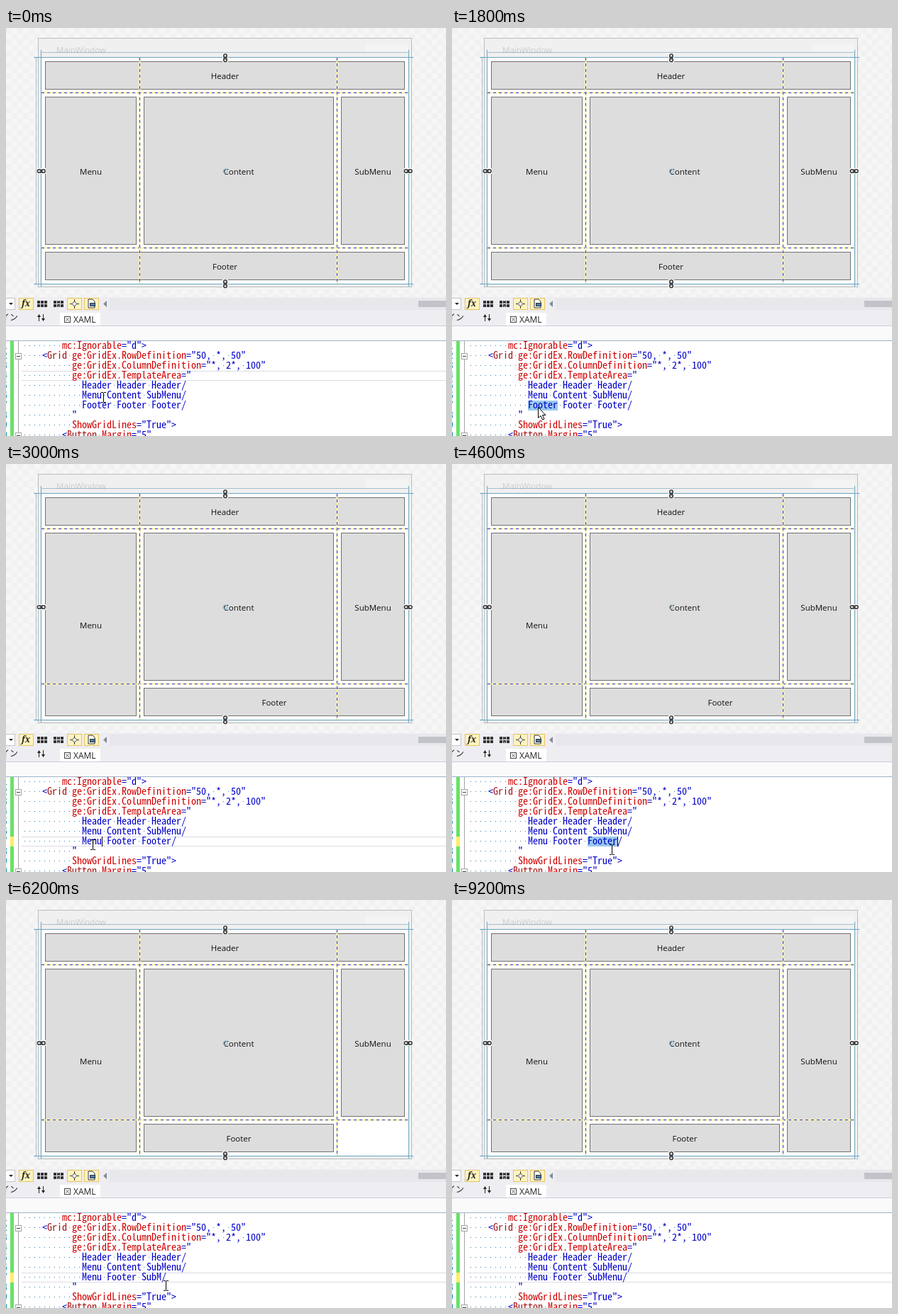
Recreate the animation shown at these times as an HTML page with a canvas. Size 620 px wide and 576 px high, loop 9.4 s.

```html
<!DOCTYPE html>
<html>
<head>
<meta charset="utf-8">
<style>
  html, body { margin: 0; width: 100%; height: 100%; overflow: hidden; background: #fff }
  canvas { display: block }
</style>
</head>
<body>
<canvas id="stage" width="620" height="576"></canvas>
<script>
const ctx = document.getElementById('stage').getContext('2d');
const LOOP = 9400, STEP = 200, CHAR = 7, LINE = 14, CODE_X = 23;
const UI = '"Open Sans", "Noto Sans", sans-serif';
const MONO = '"Noto Sans Mono CJK JP", "DejaVu Sans Mono", "Liberation Mono", monospace';

// Pick the monospace size whose advance equals one code column.
ctx.font = `100px ${MONO}`;
const monoFont = `${100 * CHAR / ctx.measureText('0').width}px ${MONO}`;

function rect(x, y, w, h, fill, stroke) {
  if (fill) { ctx.fillStyle = fill; ctx.fillRect(x, y, w, h); }
  if (stroke) {
    ctx.strokeStyle = stroke;
    ctx.lineWidth = 1;
    ctx.strokeRect(x + .5, y + .5, w - 1, h - 1);
  }
}

function line(x1, y1, x2, y2, color, dash = [], width = 1) {
  ctx.strokeStyle = color;
  ctx.lineWidth = width;
  ctx.setLineDash(dash);
  ctx.beginPath();
  ctx.moveTo(x1, y1);
  ctx.lineTo(x2, y2);
  ctx.stroke();
  ctx.setLineDash([]);
}

function poly(points, fill, stroke) {
  const path = new Path2D('M' + points + 'Z');
  ctx.fillStyle = fill;
  ctx.fill(path);
  if (stroke) { ctx.strokeStyle = stroke; ctx.lineWidth = 1; ctx.stroke(path); }
}

function text(s, x, y, color, font, align = 'left') {
  ctx.font = font;
  ctx.fillStyle = color;
  ctx.textAlign = align;
  ctx.fillText(s, x, y);
}

function panel(label, x1, y1, x2, y2) {
  rect(x1, y1, x2 - x1, y2 - y1, '#ddd', '#707070');
  text(label, (x1 + x2) / 2, (y1 + y2) / 2 + 5, '#111', `11.5px ${UI}`, 'center');
}

function gridLine(x1, y1, x2, y2) {
  line(x1, y1, x2, y2, '#fff59a', [], 2);
  line(x1, y1, x2, y2, '#3333f0', [4, 4]);
}

function chain(x, y, turned) {
  ctx.save();
  ctx.translate(x, y);
  if (turned) ctx.rotate(Math.PI / 2);
  rect(-4, -6, 8, 12, '#fff');
  ctx.strokeStyle = '#333';
  ctx.lineWidth = 1.6;
  ctx.beginPath();
  ctx.roundRect(-2.2, -5, 4.4, 5, 2);
  ctx.roundRect(-2.2, .5, 4.4, 5, 2);
  ctx.stroke();
  line(0, -2.5, 0, 3, '#333');
  ctx.restore();
}

function drawDesigner(t) {
  for (let y = 0; y < 380; y += 8)
    for (let x = 0; x < 620; x += 8)
      rect(x, y, 8, 8, (x + y) / 8 % 2 ? '#f6f6f6' : '#f1f1f1');

  rect(45, 14, 527, 352, '#f0f0f0', '#b9bcbe');
  rect(507, 22, 59, 13, '#f4f4f4');
  text('MainWindow', 71, 35, '#cbcbcb', `11.5px ${UI}`);
  rect(50, 42, 517, 319, '#fff');

  const menuTall = t >= 2800, footerShort = t >= 5800, subTall = t >= 7000;
  panel('Header', 55, 47, 562, 87);
  panel('Menu', 55, 97, 184, menuTall ? 356 : 306);
  panel('Content', 194, 97, 462, 306);
  panel('SubMenu', 472, 97, 562, subTall ? 356 : 306);
  panel('Footer', menuTall ? 194 : 55, 316, footerShort ? 462 : 562, 356);

  for (const y of [91.5, 310.5]) gridLine(50, y, 567, y);
  for (const x of [188.5, 466.5]) gridLine(x, 42, x, 361);

  line(51, 34.5, 567, 34.5, '#5d8aa8', [1, 1]);
  line(42.5, 42, 42.5, 361, '#5d8aa8', [1, 1]);
  for (const y of [41.5, 361.5]) line(39, y, 574, y, '#6aa5c4');
  for (const x of [49.5, 567.5]) line(x, 31, x, 365, '#6aa5c4');

  chain(309, 42);
  chain(309, 361);
  chain(50, 202, true);
  chain(567, 202, true);
  ctx.strokeStyle = '#7db4d8';
  ctx.lineWidth = 1;
  ctx.beginPath();
  ctx.arc(309, 202, 3, 0, 7);
  ctx.stroke();
}

function dots(x, y, cols, rows) {
  for (let i = 0; i < cols * rows; i++)
    rect(x + i % cols * 5, y + Math.floor(i / cols) * 5, 4, 4, '#333');
}

function drawToolbar() {
  rect(0, 380, 620, 41, '#eeeef2');
  rect(-5, 381, 18, 17, '#fff', '#c5c6cc');
  poly('4 388 10 388 7 391', '#222');
  for (const x of [18, 86, 110]) rect(x, 381, 21, 17, '#fff4bf', '#e5c365');
  text('fx', 22, 393, '#222', 'italic bold 12px "Noto Serif", serif');
  dots(44, 385, 3, 2);
  dots(67, 385, 3, 2);
  line(68, 389.5, 81, 389.5, '#eeeef2', [2, 2]);
  line(74, 384, 74, 395, '#eeeef2', [2, 2]);
  line(90, 389.5, 103, 389.5, '#333');
  line(96.5, 383, 96.5, 396, '#333');
  poly('96.5 386 100 389.5 96.5 393 93 389.5', '#fff', '#333');
  poly('116 383 122 383 125 386 125 395 116 395', '#fff', '#333');
  rect(118, 388, 8, 5, '#4779a8', '#333');
  poly('142 385 142 394 137 389.5', '#868999');
  rect(146, 381, 474, 17, '#e8e8ec');
  rect(581, 385, 39, 9, '#c2c3c9');

  text('イン', -7, 413, '#222', '12px "Noto Sans CJK JP", "Noto Sans CJK", sans-serif');
  line(46.5, 405, 46.5, 414, '#222');
  line(52.5, 404, 52.5, 413, '#222');
  poly('44 408 46.5 404 49 408', '#222');
  poly('50 410 52.5 414 55 410', '#222');
  rect(76, 402, 57, 19, '#fff');
  rect(82, 407, 9, 9, '#fff', '#444');
  line(84.5, 409.5, 88.5, 413.5, '#444');
  line(88.5, 409.5, 84.5, 413.5, '#444');
  text('XAML', 95, 416, '#222', `12px ${UI}`);

  rect(0, 420, 620, 22, '#fafafb');
  line(0, 420.5, 620, 420.5, '#cccedb');
  line(0, 441.5, 620, 441.5, '#9fb3c8');
}

const typed = (word, start, t) => word.slice(0, Math.floor((t - start) / STEP) + 1);
const baseline = row => 453 + row * LINE;

function foldBox(y) {
  rect(13, y, 9, 9, '#fff', '#a5a5a5');
  line(15, y + 4.5, 20, y + 4.5, '#444');
}

function drawCode(t) {
  const first = t < 2000 ? 'Footer' : typed('Menu', 2000, t);
  const last = t < 5600 ? 'Footer' : typed('SubMenu', 5600, t);
  const lines = [
    '        mc:Ignorable="d">',
    '    <Grid ge:GridEx.RowDefinition="50, *, 50"',
    '          ge:GridEx.ColumnDefinition="*, 2*, 100"',
    '          ge:GridEx.TemplateArea="',
    '            Header Header Header/',
    '            Menu Content SubMenu/',
    `            ${first} Footer ${last}/`,
    '          "',
    '          ShowGridLines="True">',
    '        <Button Margin="5"',
  ];
  const firstPicked = t >= 1400 && t < 2000, lastPicked = t >= 4400 && t < 5600;
  const wordX = 107, lastX = wordX + (first.length + 8) * CHAR;

  rect(0, 442, 620, 134, '#fff');
  rect(6, 442, 5, 134, '#67e267');
  if (t >= 2000) rect(6, 526, 5, LINE, '#ffee62');
  line(17.5, 442, 17.5, 576, '#a5a5a5');
  foldBox(459);
  foldBox(571);

  if (firstPicked) rect(wordX, 526, 42, LINE, '#99c9ef');
  else if (lastPicked) rect(lastX, 526, 42, LINE, '#99c9ef');
  else {
    const y = baseline(t < 1400 ? 3 : 6) - 11;
    line(22, y + .5, 620, y + .5, '#dcdce4');
    line(22, y + 13.5, 620, y + 13.5, '#dcdce4');
  }

  lines.forEach((code, row) => {
    const y = baseline(row);
    text((row + 1) % 10, -5, y, '#2b91af', monoFont);
    for (const m of code.matchAll(/([A-Za-z:.]+)(?==)|(?<=<)(\w+)|\S|\s/g)) {
      const x = CODE_X + m.index * CHAR;
      if (m[0] === ' ') rect(x + 3, y - 5, 1, 1, '#2b7fb0');
      else text(m[0], x, y, m[1] ? '#d00000' : m[2] ? '#a31515' : '#0000c8', monoFont);
    }
  });

  const caretOn = [[2000, 3400], [4400, 6200], [6400, 7400], [8000, 8600]];
  if (caretOn.some(([from, to]) => t >= from && t < to)) {
    const x = t < 4400 ? wordX + first.length * CHAR : lastX + last.length * CHAR;
    rect(x, 526, 1, LINE, '#000');
  }
}

const mousePath = [
  [0, 137, 521], [400, 137, 521], [1000, 121, 535], [1800, 121, 535], [2000, 122, 537],
  [3600, 122, 537], [4200, 225, 544], [7400, 225, 544], [8200, 240, 564], [LOOP, 240, 564],
];

function drawMouse(t) {
  if (t >= 8800) return;
  const i = mousePath.findIndex(p => p[0] > t);
  const [t0, x0, y0] = mousePath[i - 1], [t1, x1, y1] = mousePath[i];
  const k = (t - t0) / (t1 - t0), ease = k * k * (3 - 2 * k);
  ctx.save();
  ctx.translate(Math.round(x0 + (x1 - x0) * ease), Math.round(y0 + (y1 - y0) * ease));
  if (t >= 1400 && t < 2000) {
    poly('.5 .5 .5 15.5 4 12.5 6.5 18 9 17 6.5 11.5 11 11.5', '#fff', '#000');
  } else {
    line(.5, -6, .5, 7, '#000');
    for (const y of [-6.5, 7.5]) {
      line(-3, y, 0, y, '#000');
      line(1, y, 4, y, '#000');
    }
  }
  ctx.restore();
}

function frame(now) {
  const t = Math.floor(now % LOOP / STEP) * STEP;
  drawDesigner(t);
  drawToolbar();
  drawCode(t);
  drawMouse(t);
  requestAnimationFrame(frame);
}
requestAnimationFrame(frame);
</script>
</body>
</html>
```
